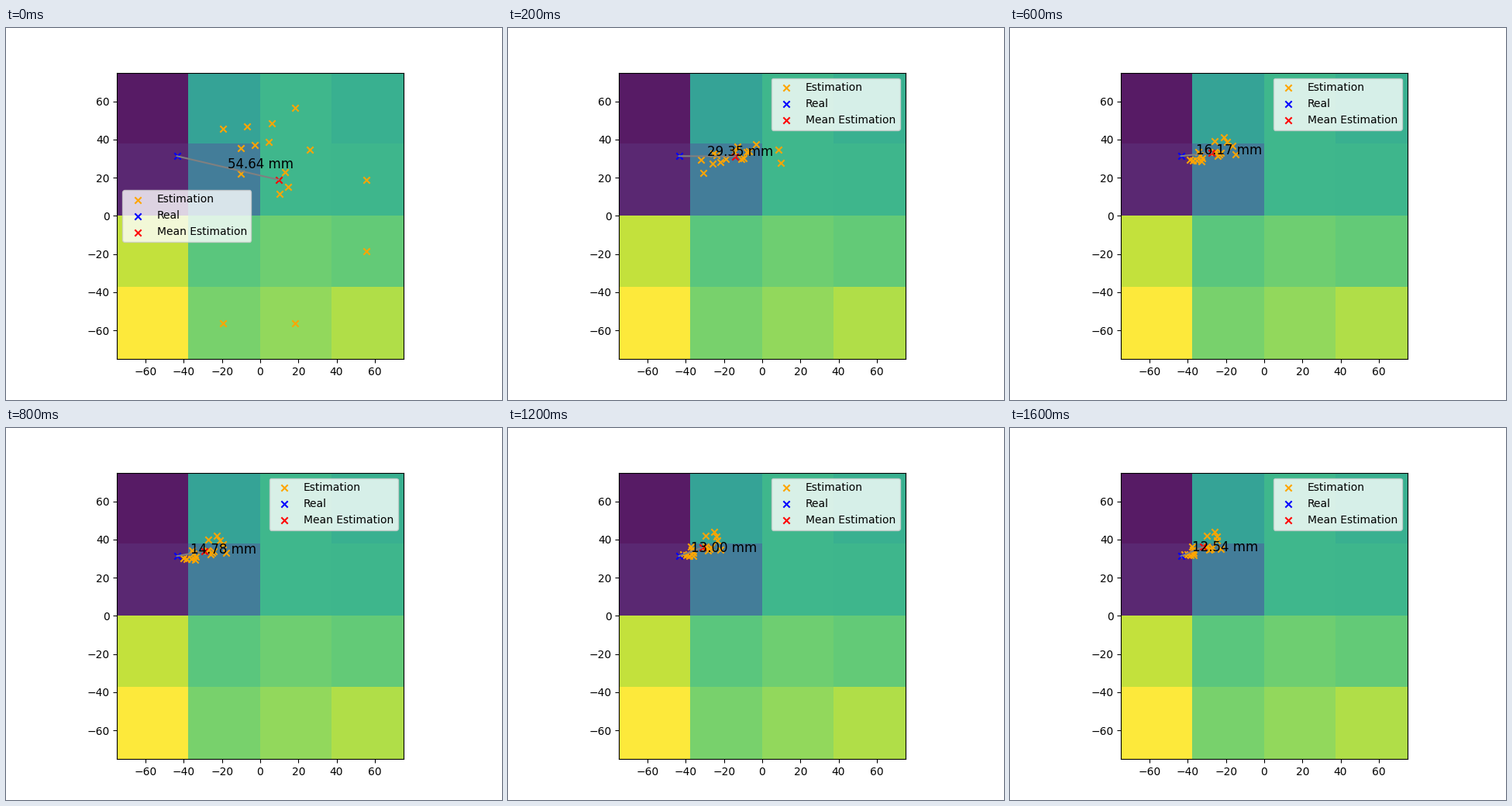
Recreate the animation shown at these times as a matplotlib script. Size 640 px wide and 480 px high, loop 1.7 s.

```python
import numpy as np
import matplotlib.pyplot as plt
from matplotlib.animation import FuncAnimation

STEPS = 17
HALF = 75                          # half the plate's side in mm
REAL = np.array([-43.6, 31.3])

# Relative intensity of each cell, top row first
CELLS = [[0.00, 0.54, 0.63, 0.60],
         [0.04, 0.36, 0.63, 0.625],
         [0.90, 0.71, 0.75, 0.73],
         [1.00, 0.77, 0.82, 0.87]]

# Measured errors in mm; between them the error decays towards FLOOR
ERRORS = {0: 54.64, 1: 36.74, 4: 20.53, 6: 16.17, 8: 14.78, 12: 13.00, 16: 12.54}
FLOOR = 12


def strand(start, end, count):
    return np.linspace(start, end, count)


def cloud(*strands):
    """Join strands of estimates, ordered from left to right."""
    points = np.vstack(strands)
    return points[np.argsort(points[:, 0], kind="stable")]


SPREAD = cloud(strand((-19.1, 45.4), (6.7, 48.3), 3),
               strand((18.75, 56.25), (26.6, 34.5), 2),
               strand((-9.5, 35.3), (5, 38.5), 3),
               strand((-9.6, 21.9), (13.6, 22.7), 2),
               strand((15.2, 15), (10.7, 11.3), 2),
               strand((56.25, 18.75), (56.25, -18.75), 2),
               strand((-18.75, -56.25), (18.75, -56.25), 2))
SETTLED = cloud(strand((-42.2, 32.2), (-37, 31.5), 4),
                strand((-37, 33), (-38.1, 36.3), 3),
                strand((-29.2, 34.3), (-27.6, 35.9), 3),
                strand((-30.4, 36.3), (-23.1, 35), 2),
                strand((-30.4, 42), (-26, 44), 2),
                strand((-24.8, 41.6), (-24.8, 39.5), 2))


def error_at(step):
    logs = np.log(np.array(list(ERRORS.values())) - FLOOR)
    return FLOOR + np.exp(np.interp(step, list(ERRORS), logs))


def mean_at(step):
    """The mean lies at the error's distance and slowly climbs."""
    rise = np.interp(step, [0, 1, 12, 16], [-12.4, -0.6, 4.5, 4.8])
    return REAL + [np.sqrt(error_at(step) ** 2 - rise ** 2), rise]


def estimates_at(step):
    """Settle as the error falls, vertically faster, around the mean."""
    first, last = error_at(0), error_at(STEPS - 1)
    left = (error_at(step) - last) / (first - last)
    points = SETTLED + (SPREAD - SETTLED) * [left, left ** 3]
    return points + mean_at(step) - points.mean(axis=0)


fig, ax = plt.subplots(figsize=(6.4, 4.8), dpi=100)


def draw(step):
    ax.clear()
    ax.imshow(CELLS, cmap="viridis", vmin=0, vmax=1, alpha=0.9,
              extent=(-HALF, HALF, -HALF, HALF), interpolation="nearest")

    mean = mean_at(step)
    ax.scatter(*estimates_at(step).T, marker="x", color="orange", label="Estimation")
    ax.scatter(*REAL, marker="x", color="blue", label="Real")
    ax.scatter(*mean, marker="x", color="red", label="Mean Estimation")
    ax.plot(*zip(REAL, mean), color="gray")
    ax.text(*(REAL + mean) / 2, f"{error_at(step):.2f} mm", fontsize=12)

    ax.set_xlim(-HALF, HALF)
    ax.set_ylim(-HALF, HALF)
    ax.legend(loc="upper right" if step else "center left")
    return ax.get_children()


anim = FuncAnimation(fig, draw, frames=STEPS, interval=100,
                     init_func=lambda: [], repeat=True, repeat_delay=0)
plt.show()
```
